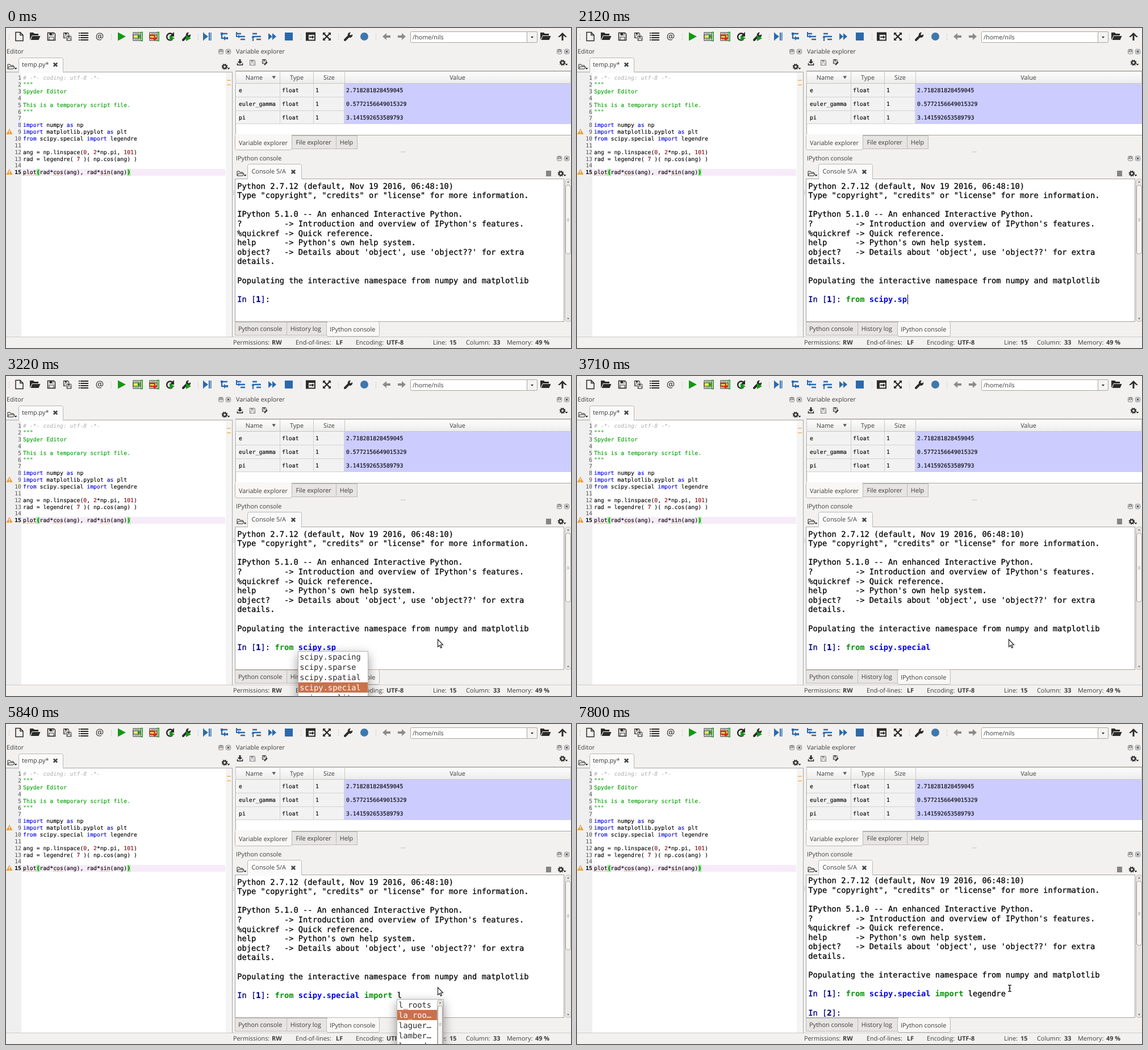
Animation of 995x563 px, one loop 8000 ms. Source, as an HTML page:

```html
<!DOCTYPE html>
<html lang="en">
<head>
<meta charset="utf-8">
<title>Python IDE session</title>
<style>
  html, body { margin: 0; width: 100%; height: 100%; overflow: hidden; background: #f2f1f0; }
  svg { display: block; }
  text { font: 10.85px "Open Sans", "Noto Sans", sans-serif; fill: #3c3c3c; white-space: pre; text-rendering: geometricPrecision; }
  .b { font-weight: 700; }
  .mid { text-anchor: middle; }
  .code { font: 9.82px "DejaVu Sans Mono", monospace; fill: #000; stroke: #000; stroke-width: .12; }
  .num { text-anchor: end; fill: #555; stroke: none; }
  .now { font-weight: 700; fill: #000; }
  .con { font: 13.754px "DejaVu Sans Mono", monospace; fill: #000; stroke: #000; stroke-width: .25; }
  .key { fill: #0000e0; stroke: #0000e0; }
  .lit { fill: #800000; stroke: #800000; }
  .str { fill: #00a000; stroke: #00a000; }
  .rem { fill: #adadad; stroke: none; font-style: italic; }
  .navy { fill: #000080; stroke: #000080; }
  .kw { fill: #0a8f0a; stroke: none; font-weight: 700; }
  .mod { fill: #0000f0; stroke: none; font-weight: 700; }
  .item { stroke: none; }
  .pop { filter: drop-shadow(0 6px 9px rgba(0, 0, 0, .4)); }
</style>
</head>
<body>
<svg id="stage" width="995" height="563" viewBox="0 0 995 563"></svg>
<script>
const INK = '#2b2b2b', EDGE = '#bcb8b4', PANE = '#a8a4a0', BLUE = '#2a69ad', GREEN = '#129a12';
const ADV = 8.28, CON_X = 407.2, CON_Y = 282.5, CON_PITCH = 16.6, LINE = 11.86;

const rect = (x, y, w, h, fill, more = '') =>
  `<rect x="${x}" y="${y}" width="${w}" height="${h}" fill="${fill}" ${more}/>`;
const box = (x, y, w, h, fill, edge = EDGE, r = 0) =>
  rect(x + .5, y + .5, w - 1, h - 1, fill, `stroke="${edge}" rx="${r}"`);
const fill = (d, color = INK) => `<path d="${d}" fill="${color}"/>`;
const line = (d, color = INK, width = 2, more = '') =>
  `<path d="${d}" fill="none" stroke="${color}" stroke-width="${width}" ${more}/>`;
const text = (x, y, s, cls = '') => `<text x="${x}" y="${y}" class="${cls}">${s}</text>`;
const span = (cls, s) => `<tspan class="${cls}">${s}</tspan>`;
const at = (x, y, inner) => `<g transform="translate(${x} ${y})">${inner}</g>`;

const caretDown = (x, y) => fill(`M${x - 2.5} ${y}h5l-2.5 3z`);
const cross = (x, y, r, w, color = INK) =>
  line(`M${x - r} ${y - r}l${2 * r} ${2 * r}m0 ${-2 * r}l${-2 * r} ${2 * r}`, color, w);
const gear = (x, y) =>
  `<circle cx="${x}" cy="${y}" r="3" fill="none" stroke="${INK}" stroke-width="2.2"/>` +
  `<circle cx="${x}" cy="${y}" r="4.6" fill="none" stroke="${INK}" stroke-width="1.6" stroke-dasharray="1.8 1.81"/>` +
  caretDown(x + 7, y + 2);
const dock = (x, y) =>
  box(x - 4, y - 4, 9, 9, '#f8f8f8', '#777', 2) + line(`M${x - 1.5} ${y + 2}v-4h4v3h-3`, '#444', 1) +
  box(x + 9, y - 4, 9, 9, '#f8f8f8', '#777', 2) + cross(x + 13.5, y + .5, 2, 1.4, '#444');
const grip = (x, y) => [0, 4, 8].map(d => rect(x, y + d, 1, 1.5, '#b5b1ad')).join('');
const smallFolder = (x, y) =>
  line(`M${x} ${y + 8}v-8h4l1 2h5v2m-10 4l2-4h10l-2 4z`, INK, 1) + caretDown(x + 14, y + 6);
const folder = x => at(x, 15, fill('M-9 6v-13h6l2 2h7v3h-11z') + fill('M-7.500 6l3-7h14l-3 7z'));
const play = (w, h, color) => fill(`M0 ${-h}l${w} ${h}l${-w} ${h}z`, color);
const floppy = s => `<g transform="scale(${s})">` + line('M-6.500-6.500h11l2 2v11h-13z', INK, 1.5) +
  rect(-3.5, -6, 7, 4, INK) + rect(1, -5.5, 1.5, 3, '#fff') + rect(-4, 1, 8, 5, '#fff', `stroke="${INK}"`) + '</g>';
const wrench = (color = INK) => line('M-6 6l7-7', color, 4, 'stroke-linecap="round"') +
  fill('M-1-1c-1-4 2-7 5-6l-2 3 2 2 3-2c1 4-2 6-5 6z', color);
const cell = arrow => rect(-8, -7, 13, 14, '#fff', `stroke="${INK}"`) + rect(-8, -3, 13, 6, '#f4ea5c', `stroke="${INK}"`) +
  line('M-6-5h9m-9 10h9', GREEN, 1) + line('M5-7.500h4M5 7.500h4M8-7v14', GREEN, 1.6) + arrow;
const steps = line('M-7-5h8m-4 5h11m-8 5h8', BLUE, 2.5);

function toolbar() {
  const icons = [
    [23, line('M-6-7.500h8l5 5v10h-13zM2-7.500v5h5', INK, 1.5)],
    [80, floppy(1)],
    [108, at(-2, -2, floppy(.7)) + at(3, 3, rect(-5, -5, 10, 10, '#f2f1f0') + floppy(.62))],
    [136, [-6, -2, 2, 6].map(y => rect(-8, y - 1, 2, 2, INK) + rect(-5, y - 1, 14, 2, INK)).join('')],
    [165, '<text class="mid" y="5" style="font-size:16px;fill:#222">@</text>'],
    [197, play(14, 7.5, GREEN)],
    [232, cell(play(5, 4, GREEN))],
    [261, cell(line('M-8-2h9m0 0v7m-3-3l3 4 3-4M-8 3h5', '#e02510', 2.4))],
    [289, line('M4 5a6 6 0 1 1 1-8', INK, 2.5) + fill('M7-8v8h-8z') + at(-1, 3, play(9, 5, GREEN))],
    [318, wrench() + at(-1, 3, play(9, 5, GREEN))],
    [354, at(-6, 0, play(8, 6, BLUE)) + rect(3, -7, 2, 14, BLUE) + rect(6, -7, 1.5, 14, BLUE) + rect(-7, -7, 1.5, 14, BLUE)],
    [384, line('M6-5h-10v8h4', BLUE, 2.3) + at(0, 3, play(5, 4, BLUE)) + rect(-6, -7, 4, 4, BLUE) + rect(4, 1, 3, 4, BLUE)],
    [413, steps + line('M-7-8v8h4', BLUE, 2) + at(-4, 0, play(4, 3, BLUE))],
    [441, steps + line('M-6 8v-8h3', BLUE, 2) + fill('M-9 2l3-4 3 4z', BLUE)],
    [469, at(-7, 0, play(7, 6, BLUE)) + at(0, 0, play(7, 6, BLUE))],
    [498, rect(-7, -7, 14, 14, BLUE)],
    [536, rect(-7, -6.5, 15, 13, '#fff', `stroke="${INK}" stroke-width="2"`) + rect(-7, -7, 15, 4, INK) + rect(-7, -6, 4, 12, INK) + line('M-2 1h8', INK, 2) + at(3, 1, play(4, 3, INK))],
    [565, cross(0, 0, 5, 2.4) + fill('M-7-7h5l-5 5zM7-7h-5l5 5zM-7 7h5l-5-5zM7 7h-5l5-5z')],
    [603, wrench()],
    [631, '<circle r="7" fill="#3e78ad"/>'],
    [670, fill('M-7 0l7-6v4h7v4h-7v4z', '#8b8b8b')],
    [697, fill('M7 0l-7-6v4h-7v4h7v4z', '#8b8b8b')],
    [980, fill('M0-7l8 8h-3l-3.500-3v9h-3v-9l-3.500 3h-3z')],
  ];
  return [5, 185, 338, 519, 585, 651].map(x => grip(x, 11)).join('') +
    icons.map(([x, d]) => at(x, 15, d)).join('') + folder(51) + folder(950) +
    box(712, 6, 224, 20, '#fff', '#a9a5a1', 2) + box(917, 6, 19, 20, '#f4f3f2', '#a9a5a1', 2) +
    caretDown(926.5, 15) + text(716, 20, '/home/nils');
}

function editor() {
  const k = s => span('key', s), n = s => span('lit', s);
  const lines = [
    span('rem', '# -*- coding: utf-8 -*-'), span('str', '"""'), span('str', 'Spyder Editor'), '',
    span('str', 'This is a temporary script file.'), span('str', '"""'), '',
    `${k('import')} numpy ${k('as')} np`,
    `${k('import')} matplotlib.pyplot ${k('as')} plt`,
    `${k('from')} scipy.special ${k('import')} legendre`, '',
    `ang = np.linspace(${n(0)}, ${n(2)}*np.pi, ${n(101)})`,
    `rad = legendre( ${n(7)} )( np.cos(ang) )`, '',
    'plot(rad*cos(ang), rad*sin(ang))'];
  const col = c => 30 + c * 5.912;
  const warn = y => fill(`M6 ${y - 5}l5.500 10h-11z`, '#eb9a2d') + rect(5.3, y - 2, 1.4, 4, '#fff') + rect(5.3, y + 3, 1.4, 1.2, '#fff');
  return text(1, 45, 'Editor') + dock(378, 41) + smallFolder(3, 64) + gear(385, 68) +
    box(-1, 77, 400, 467, '#fff', PANE) + rect(0, 78, 27, 465, '#efefef') + rect(387, 78, 11, 465, '#f4f4f4') +
    box(22, 52, 79, 27, '#fafafa', EDGE, 3) + rect(23, 76, 77, 3, '#fafafa') +
    text(28, 68, 'temp.py*') + cross(87, 64.5, 3.2, 2.6, '#444') +
    rect(389, 91, 7, 2, '#f5c27a') + rect(389, 99, 7, 2, '#f5c27a') +
    rect(27, 248, 359, 12, '#f6ebf8') +
    [4, 31].map(c => rect(col(c), 248, 6, 12, '#8ff58f')).join('') +
    lines.map((s, i) => {
      const y = 91.3 + i * LINE;
      return text(27, y, i + 1, 'code num' + (i == 14 ? ' now' : '')) + text(30, y, s, 'code');
    }).join('') +
    [[0, 4], [9, 3], [23, 3]].map(([c, w]) => line(`M${col(c)} 259h${w * 5.912}`, '#e8a13c', 1, 'stroke-dasharray="2 1.500"')).join('') +
    warn(182) + warn(253);
}

function explorer() {
  const cols = [[404, 79], [482, 60], [541, 56], [596, 399]];
  const rows = [['e', '2.718281828459045'], ['euler_gamma', '0.5772156649015329'], ['pi', '3.141592653589793']];
  return text(405, 45, 'Variable explorer') + dock(974, 41) + gear(980, 61) +
    fill('M410.500 55h3v4h3l-4.500 4-4.500-4h3z') + line('M407.500 62v3h9v-3', INK, 1.6) +
    at(434, 61, `<g opacity=".55">${floppy(.7)}</g>`) + at(455, 59, floppy(.55)) + line('M455 65l5-5', INK, 2) +
    box(404, 75, 592, 114, '#fff', PANE) +
    cols.map(([x, w]) => box(x, 76, w, 22, 'url(#head)', '#c9c6c3')).join('') +
    text(437, 91, 'Name', 'mid') + fill('M468.500 84.500h6.500l-3.250 5z', '#555') +
    text(512, 91, 'Type', 'mid') + text(569, 91, 'Size', 'mid') + text(795, 91, 'Value', 'mid') +
    rect(407, 98, 189, 71, '#f2f2f2') + rect(596, 98, 399, 71, '#ccccff') +
    line('M405 121.500H596M405 145.500H596M405 168.500H596M482.500 98v71M541.500 98v71M595.500 98v71', '#d2d2d2', 1) +
    rows.map(([name, value], i) =>
      [[410, name], [486, 'float'], [545, 1], [599, value]].map(([x, s]) => text(x, 113.3 + i * 23.7, s, 'code')).join('')
    ).join('') +
    box(503, 189, 79, 24, '#e7e5e3') + box(581, 189, 38, 24, '#e7e5e3') + box(403, 187, 101, 28, '#f8f7f6', EDGE, 3) +
    rect(404, 187, 99, 2, '#f8f7f6') +
    text(410, 205.5, 'Variable explorer') + text(510.5, 205, 'File explorer') + text(587.7, 205, 'Help') +
    [696, 699, 702].map(x => rect(x, 217, 1, 2, '#aaa')).join('') + [286, 289, 292].map(y => rect(400, y, 2, 1, '#aaa')).join('');
}

function consolePane() {
  const lines = ['Python 2.7.12 (default, Nov 19 2016, 06:48:10)',
    'Type "copyright", "credits" or "license" for more information.', '',
    'IPython 5.1.0 -- An enhanced Interactive Python.',
    "?         -&gt; Introduction and overview of IPython's features.",
    '%quickref -&gt; Quick reference.',
    "help      -&gt; Python's own help system.",
    "object?   -&gt; Details about 'object', use 'object??' for extra",
    'details.', '',
    'Populating the interactive namespace from numpy and matplotlib', ''];
  const prompt = n => span('navy', 'In [') + span('navy b', n) + span('navy', ']: ');
  const row = (i, s, id = '') => `<text ${id} class="con" x="${CON_X}" y="${CON_Y + i * CON_PITCH}">${s}</text>`;
  const parts = ['kw', '', 'mod', '', '', ''].map(c => `<tspan class="${c}"></tspan>`).join('');
  return text(405, 233, 'IPython console') + dock(974, 229) + smallFolder(407, 252) + gear(977, 256) +
    rect(951, 251, 9, 10, '#858585') +
    box(403, 265, 580, 252, '#fff', PANE) +
    box(425, 239, 96, 28, '#fafafa', EDGE, 3) + rect(426, 264, 94, 3, '#fafafa') +
    text(432.5, 256, 'Console 5/A') + cross(506, 253, 3.2, 2.6, '#444') +
    `<g clip-path="url(#view)"><g id="scroll">` + lines.map((s, i) => row(i, s)).join('') +
    row(12, prompt(1) + `<tspan id="typed">${parts}</tspan>`) + row(14, prompt(2), 'id="next"') + '</g></g>' +
    box(984, 265, 12, 252, '#e9e7e5', EDGE, 5) + '<g id="thumb"></g>' +
    fill('M988 272h4l-2-3z', '#777') + fill('M988 510h4l-2 3z', '#777') +
    box(403, 517, 92, 24, '#e7e5e3') + box(494, 517, 71, 24, '#e7e5e3') + box(564, 516, 94, 27, '#f8f7f6', EDGE, 3) +
    text(409, 533, 'Python console') + text(500.7, 533, 'History log') + text(570, 533.5, 'IPython console');
}

function statusBar() {
  const items = [[400, 'Permissions:'], [468, 'RW', 1], [510, 'End-of-lines:'], [581, 'LF', 1], [616, 'Encoding:'],
    [670, 'UTF-8', 1], [752, 'Line:'], [781, 15, 1], [810, 'Column:'], [858, 33, 1], [882, 'Memory:'], [932, '49 %', 1]];
  return rect(0, 543, 995, 1, '#cfccc9') + items.map(([x, s, b]) => text(x, 557, s, b && 'b')).join('');
}

function popup(id, x, w, items, bar) {
  return `<g id="${id}"><g class="pop">${box(x - 1, 484, w + 2, 110, '#fff', '#b9b5b1')}</g>` +
    rect(x, 485, bar ? 70 : w, 18, '#c8724b', 'class="pick"') +
    items.map((s, i) => text(x + 2.2, 499 + 18 * i, s, 'con item')).join('') +
    (bar ? box(x + 70, 485, 11, 110, '#e9e7e5', EDGE, 4) + box(x + 71, 495, 9, 98, '#f6f5f4', '#a5a19d', 4) +
      fill('M762.500 491.500h4l-2-3z', '#777') + line('M762.500 526.500h4m-4 2h4m-4 2h4', '#b5b1ad', 1) : '') + '</g>';
}

const stage = document.getElementById('stage');
stage.innerHTML = `<defs>
  <linearGradient id="head" x2="0" y2="1"><stop stop-color="#fdfdfd"/><stop offset="1" stop-color="#ececeb"/></linearGradient>
  <clipPath id="view"><rect x="404" y="266" width="578" height="250"/></clipPath></defs>` +
  rect(0, 0, 995, 563, '#f2f1f0') + toolbar() + editor() + explorer() + consolePane() + statusBar() +
  rect(0, 0, 1, 17, '#000', 'id="caret"') +
  popup('modules', 515, 122, ['scipy.spacing', 'scipy.sparse', 'scipy.spatial', 'scipy.special', 'scipy.split']) +
  popup('names', 689, 81, ['l_roots', 'la_roo…', 'laguer…', 'lamber…', 'legend…'], true) +
  `<path id="arrow" d="M760.500 463.500v13l3-2.500 2 4.500 2-1-2-4.500h4z" fill="#fff" stroke="#222" stroke-width="1.200"/>` +
  `<path id="beam" d="M759 459.500h2l1 1 1-1h2M762 460v10M759 470.500h2l1-1 1 1h2M760.500 465h3" fill="none" stroke="#222" stroke-width="1.500"/>`;

const el = id => document.getElementById(id);
const show = (id, on) => el(id).setAttribute('visibility', on ? 'visible' : 'hidden');
const within = (t, a, b) => t >= a && t < b;
const passed = (t, times) => times.filter(x => t >= x).length;

const COMMAND = 'from scipy.special import legendre';
const CUTS = [0, 4, 5, 18, 19, 25, 34];
const KEYS = [460, 610, 700, 780, 870, 1070, 1140, 1210, 1280, 1420, 1570, 1940, 2060,
  ...Array(5).fill(3660), 4090, 4160, 4230, 4300, 4370, 4530, 4590, 4710, 4900, ...Array(7).fill(6820)];
const typedParts = [...el('typed').children];

function select(id, index) {
  const menu = el(id);
  menu.querySelector('.pick').setAttribute('y', 485 + 18 * index);
  menu.querySelectorAll('.item').forEach((item, i) => { item.style.fill = i === index ? '#fff' : '#2b2b2b'; });
}

function draw(t) {
  const count = passed(t, KEYS), entered = t >= 7370;
  typedParts.forEach((part, i) => { part.textContent = COMMAND.slice(CUTS[i], Math.min(count, CUTS[i + 1])); });
  typedParts[0].setAttribute('class', count >= 4 ? 'kw' : '');
  typedParts[4].setAttribute('class', t >= 4640 ? 'kw' : '');

  el('scroll').setAttribute('transform', `translate(0 ${entered ? -2.3 : 0})`);
  show('next', entered);
  const height = entered ? 114 : 122;
  el('thumb').innerHTML = box(985, 276, 10, height, '#f6f5f4', '#a5a19d', 4) +
    [-2, 0, 2].map(d => rect(988, 276 + height / 2 + d, 4, 1, '#b5b1ad')).join('');

  el('caret').setAttribute('x', Math.round(CON_X + .7 + ADV * (entered ? 8 : 8 + count)));
  el('caret').setAttribute('y', entered ? 500 : 469);
  el('caret').setAttribute('height', entered ? 16 : 17);
  show('caret', within(t, 120, 2430) || within(t, 4090, 5080) || within(t, 6870, 7800));

  show('modules', within(t, 2430, 3660));
  show('names', within(t, 5330, 6820));
  select('modules', passed(t, [2880, 3060, 3220]));
  select('names', passed(t, [5840, 6260, 6380, 6500]));

  const arrow = within(t, 2430, 3740) || within(t, 5330, 6870);
  show('arrow', arrow);
  show('beam', t >= 3740 && !arrow);
}

const start = performance.now();
function tick() {
  draw((performance.now() - start) % 8000);
  requestAnimationFrame(tick);
}
tick();
</script>
</body>
</html>
```
